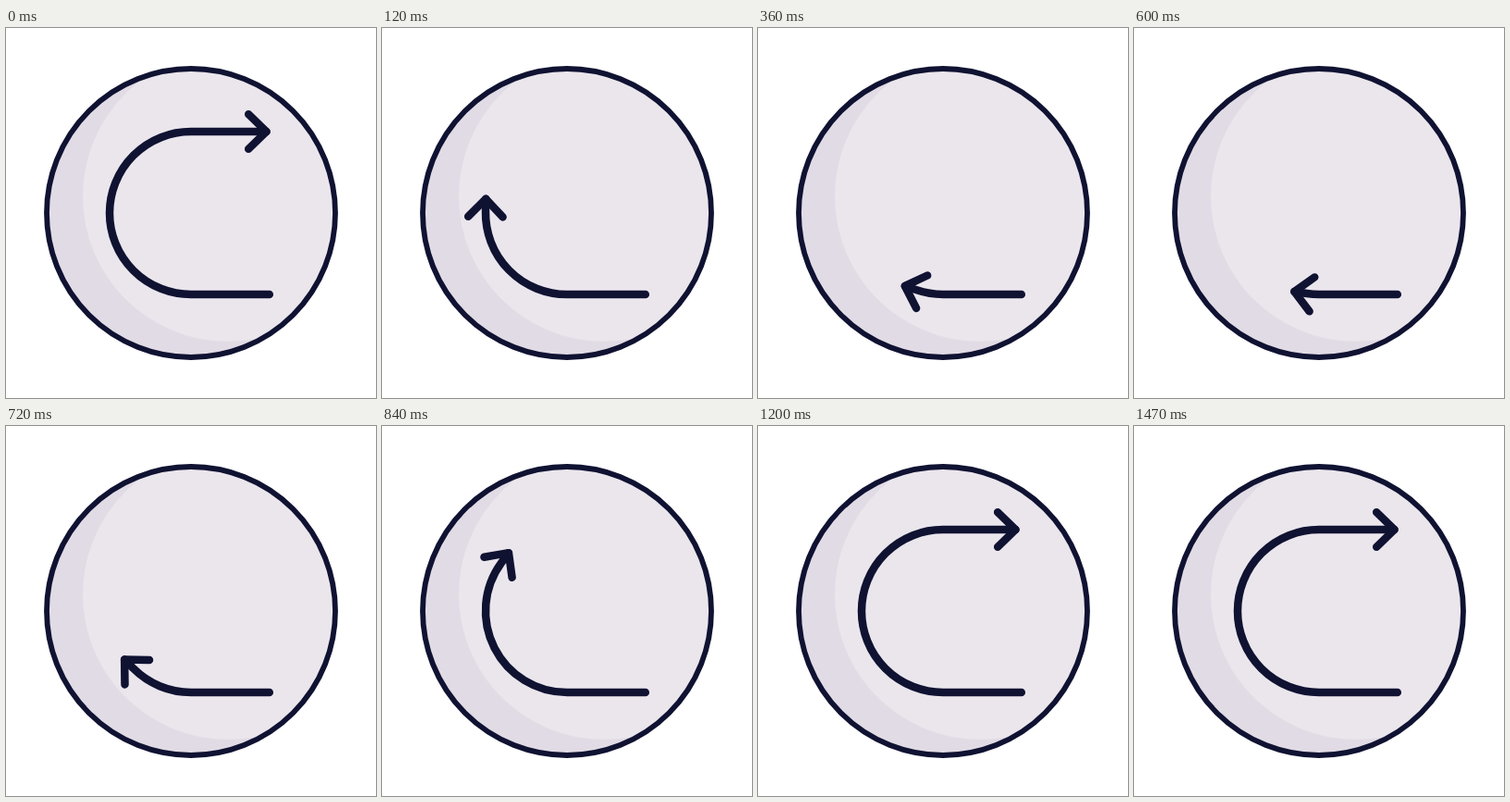
An HTML page that plays this animation: 400x400 px, repeating every 3830 ms.

```html
<!DOCTYPE html>
<html lang="en">
<head>
<meta charset="utf-8">
<title>Redo arrow</title>
<style>
  html, body { margin: 0; width: 100%; height: 100%; overflow: hidden; background: #fff; }
  svg { display: block; width: 100vw; height: 100vh; }
  .ink { fill: none; stroke: #101232; stroke-linecap: round; stroke-linejoin: round; }
</style>
</head>
<body>
<svg viewBox="0 0 400 400">
  <defs><clipPath id="disc"><circle cx="200" cy="200" r="156"/></clipPath></defs>
  <g clip-path="url(#disc)">
    <rect width="400" height="400" fill="#e1dbe5"/>
    <circle cx="240" cy="182" r="157" fill="#eae6ec"/>
  </g>
  <circle class="ink" cx="200" cy="200" r="156" stroke-width="5.8"/>
  <path class="ink" id="line" stroke-width="8.5"/>
  <path class="ink" id="head" stroke-width="8.5" d="M-5.8-18.7L13.5 0L-5.8 18.7"/>
</svg>
<script>
  const LOOP = 3830, STEP = 30, REST = 1470;
  const CX = 200, CY = 200, R = 88, START_X = 284.8, TIP = 13.5;
  const LEG = START_X - CX, ARC = Math.PI * R;
  const LONG = LEG + ARC + 68, SHORT = 94.7;
  const TURN = 562, HIT = 937;

  const line = document.getElementById('line');
  const head = document.getElementById('head');

  // Distance below full length after hitting the end: bounces that halve in time.
  function bounce(t) {
    let width = 276, height = 17;
    while (t > width && width > 1) {
      t -= width;
      width /= 2;
      height /= 4;
    }
    const u = Math.min(1, t / width);
    return 4 * height * u * (1 - u);
  }

  // Length of the line up to the arrowhead's pivot.
  function lengthAt(t) {
    const span = LONG - SHORT;
    if (t >= REST) return LONG;
    if (t < TURN) {
      const decay = x => Math.exp(-x / 127);
      return SHORT + span * (decay(t) - decay(TURN) * (t / TURN) ** 4);
    }
    if (t < HIT) return SHORT + span * ((t - TURN) / (HIT - TURN)) ** 2;
    return LONG - bounce(t - HIT);
  }

  // Pivot point and turn angle, counted clockwise from heading left.
  function pivotAt(s) {
    const a = Math.max(0, Math.min(Math.PI, (s - LEG) / R));
    const past = Math.max(0, s - LEG - ARC);
    return { a, x: CX - R * Math.sin(a) + past, y: CY + R * Math.cos(a), past };
  }

  function draw(t) {
    const { a, x, y, past } = pivotAt(lengthAt(t));
    const arcX = x - past;
    const tipX = x - TIP * Math.cos(a), tipY = y - TIP * Math.sin(a);
    line.setAttribute('d',
      `M${START_X} ${CY + R}H${CX}A${R} ${R} 0 0 1 ${arcX} ${y}L${tipX} ${tipY}`);
    head.setAttribute('transform',
      `translate(${x} ${y}) rotate(${a * 180 / Math.PI + 180})`);
  }

  const begin = performance.now();
  function tick() {
    const t = (performance.now() - begin) % LOOP;
    draw(Math.min(REST, Math.floor(t / STEP) * STEP));
    requestAnimationFrame(tick);
  }
  tick();
</script>
</body>
</html>
```
